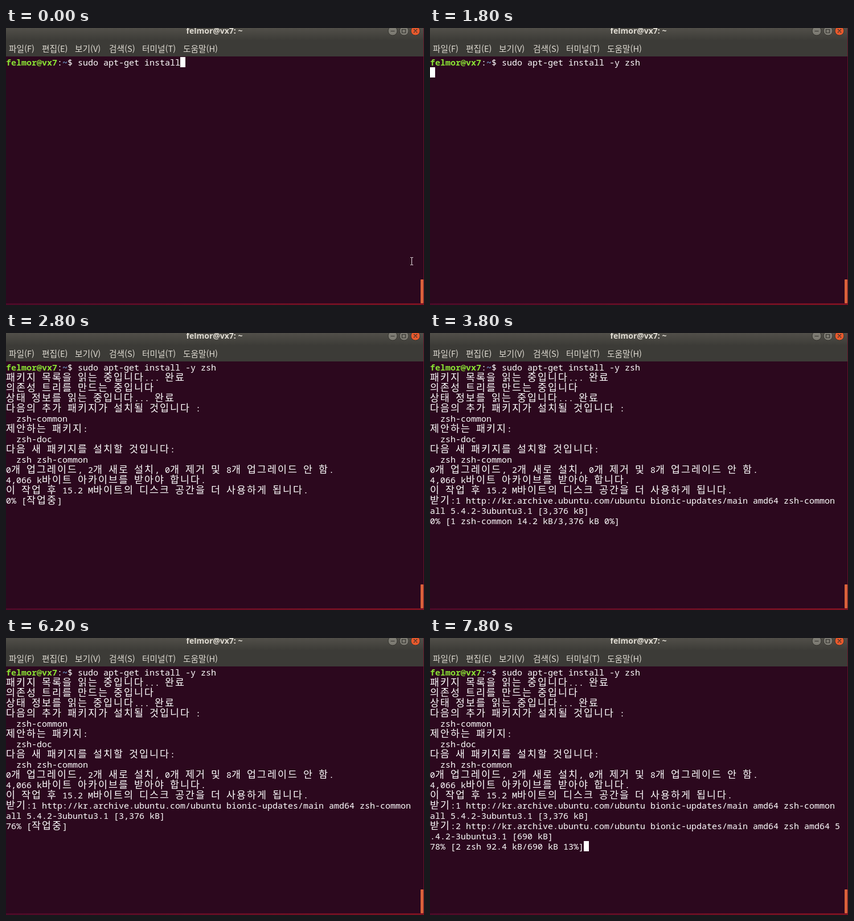
Write an HTML page that moves like this. It is 734x487 px and loops after 8 s.

```html
<!DOCTYPE html>
<html lang="ko">
<head>
<meta charset="utf-8">
<title>Terminal</title>
<style>
  html, body { margin: 0; width: 100%; height: 100%; overflow: hidden; background: #2c081e; }
  svg { display: block; }
  text { fill: #fff; }
  .mono { font: 15px "Noto Sans Mono", "DejaVu Sans Mono", monospace; }
  .hangul { font: 17.33px "Noto Sans CJK KR", "Noto Sans CJK", sans-serif; }
  .user { font-weight: 700; fill: #8ae234; }
  .path { font-weight: 700; fill: #729fcf; }
  .menu text { font: 14.67px "Noto Sans CJK KR", "Noto Sans CJK", sans-serif; fill: #dfdbd2; }
  .title { font: 700 14px "Noto Sans", "Open Sans", sans-serif; fill: #dfdbd2; text-anchor: middle; }
  .icons { fill: none; stroke: #33322e; stroke-width: 1.2; }
</style>
</head>
<body>
<svg width="734" height="487" viewBox="0 0 734 487">
  <defs>
    <linearGradient id="bar" x2="0" y2="1">
      <stop offset="0" stop-color="#514f49"/><stop offset="1" stop-color="#3c3b37"/>
    </linearGradient>
    <linearGradient id="edge">
      <stop offset="0" stop-color="#4c0a28"/><stop offset="1" stop-color="#7c1222"/>
    </linearGradient>
  </defs>
  <rect width="734" height="487" fill="#2c081e"/>
  <rect width="734" height="50" fill="#3c3b37"/>
  <rect width="734" height="22" fill="url(#bar)"/>
  <text class="title" x="366" y="10">felmor@vx7: ~</text>
  <g stroke="#35342f">
    <circle cx="679" cy="5" r="8" fill="#7d7b73"/>
    <circle cx="699" cy="5" r="8" fill="#7d7b73"/>
    <circle cx="719" cy="5" r="8" fill="#e9592c"/>
  </g>
  <path class="icons" d="M675.5 5.5h7M695.5 2.5h6v6h-6zM716 2l6 6M722 2l-6 6"/>
  <g class="menu">
    <text x="5" y="42">파일(F)</text>
    <text x="63" y="42">편집(E)</text>
    <text x="121" y="42">보기(V)</text>
    <text x="181" y="42">검색(S)</text>
    <text x="239" y="42">터미널(T)</text>
    <text x="311" y="42">도움말(H)</text>
  </g>
  <rect x="733" width="1" height="487" fill="#651329"/>
  <rect y="484" width="734" height="3" fill="url(#edge)"/>
  <rect x="728" y="442" width="5" height="42" rx="1" fill="#d9623a"/>
  <g id="screen"></g>
  <path id="pointer" d="M710 403.5h2l.5 .5 .5-.5h2M712.5 404v12M710 416.5h2l.5-.5 .5 .5h2" fill="none" stroke="#e8e0e4"/>
</svg>
<script>
const CELL = 9, ROW = 18, TOP = 51, LOOP = 8000;
const screen = document.getElementById('screen');
const pointer = document.getElementById('pointer');

const prompt = 'felmor@vx7:~$ ';
const install = prompt + 'sudo apt-get install';
const command = install + ' -y zsh';
const reading = '패키지 목록을 읽는 중입니다... ';
const tree = '의존성 트리를 만드는 중입니다';
const state = '상태 정보를 읽는 중입니다... ';
const lists = [command, reading + '완료'];
const plan = [
  ...lists, tree, state + '완료',
  '다음의 추가 패키지가 설치될 것입니다 :', '  zsh-common',
  '제안하는 패키지:', '  zsh-doc',
  '다음 새 패키지를 설치할 것입니다:', '  zsh zsh-common',
  '0개 업그레이드, 2개 새로 설치, 0개 제거 및 8개 업그레이드 안 함.',
  '4,066 k바이트 아카이브를 받아야 합니다.',
  '이 작업 후 15.2 M바이트의 디스크 공간을 더 사용하게 됩니다.'
];
const source = 'http://kr.archive.ubuntu.com/ubuntu bionic-updates/main amd64 ';
const first = [...plan, '받기:1 ' + source + 'zsh-common', 'all 5.4.2-3ubuntu3.1 [3,376 kB]'];
const second = [...first, '받기:2 ' + source + 'zsh amd64 5', '.4.2-3ubuntu3.1 [690 kB]'];
const common = (total, size, part) => [...first, `${total}% [1 zsh-common ${size} kB/3,376 kB ${part}%]`];
const shell = (total, size, part) => [...second, `${total}% [2 zsh ${size} kB/690 kB ${part}%]`];

// Start time and the lines on screen from then on
const steps = [
  [0, [install]],
  ...[100, 200, 500, 700, 900, 1200, 1400].map((t, i) =>
    [t, [command.slice(0, install.length + i + 1)]]),
  [1800, [command, '']],
  [1900, [command, reading + '0%']],
  [2000, [...lists, tree + '... 0%']],
  [2400, [...lists, tree, state + '0%']],
  [2800, [...plan, '0% [작업중]']],
  [3400, [...plan, '0% [kr.archive.ubuntu.com(203.0.113.110)에 연결하는 중입니다]']],
  [3800, common(0, '14.2', 0)],
  [4300, common(2, '87.8', 2)],
  [4800, common(4, '189', 5)],
  [5300, common(8, '386', 11)],
  [5800, common(50, '2,024', 60)],
  [6200, [...first, '76% [작업중]']],
  [6500, shell(76, '14.2', 2)],
  [7000, shell(78, '92.4', 13)]
];
// Times at which the block cursor turns off and on, alternately
const blinks = [2800, 3000, 3600, 4300, 4800, 5400, 6000, 6600, 7300, 7800];

const isHangul = c => /[가-힣]/.test(c);
const cells = s => [...s].reduce((n, c) => n + (isHangul(c) ? 2 : 1), 0);

function word(s, col, row, style = '') {
  const wide = isHangul(s[0]);
  const xs = [...s].map((_, i) => (col + i * (wide ? 2 : 1)) * CELL);
  return `<text class="${wide ? 'hangul' : 'mono'} ${style}" x="${xs.join(' ')}" y="${TOP + row * ROW + 15}">${s}</text>`;
}

function line(s, row) {
  if (row === 0) {
    return word(s.slice(0, 10), 0, 0, 'user') + word(':', 10, 0) + word('~', 11, 0, 'path') +
      word('$', 12, 0) + words(s, 0, prompt.length);
  }
  return words(s, row, 0);
}

function words(s, row, from) {
  return [...s.slice(from).matchAll(/[가-힣]+|[^\s가-힣]+/g)]
    .map(m => word(m[0], cells(s.slice(0, from + m.index)), row)).join('');
}

let shown = '';
function draw(now) {
  const t = now % LOOP;
  const index = steps.filter(s => s[0] <= t).length - 1;
  const on = blinks.filter(b => b <= t).length % 2 === 0;
  const key = index + ':' + on;
  if (key !== shown) {
    shown = key;
    const lines = steps[index][1], last = lines.length - 1;
    const cursor = on
      ? `<rect x="${cells(lines[last]) * CELL}" y="${TOP + last * ROW}" width="${CELL}" height="${ROW}" fill="#fff"/>`
      : '';
    screen.innerHTML = lines.map(line).join('') + cursor;
    pointer.style.display = index ? 'none' : '';
  }
}

const start = performance.now();
function tick() {
  draw(performance.now() - start);
  requestAnimationFrame(tick);
}
tick();
</script>
</body>
</html>
```
